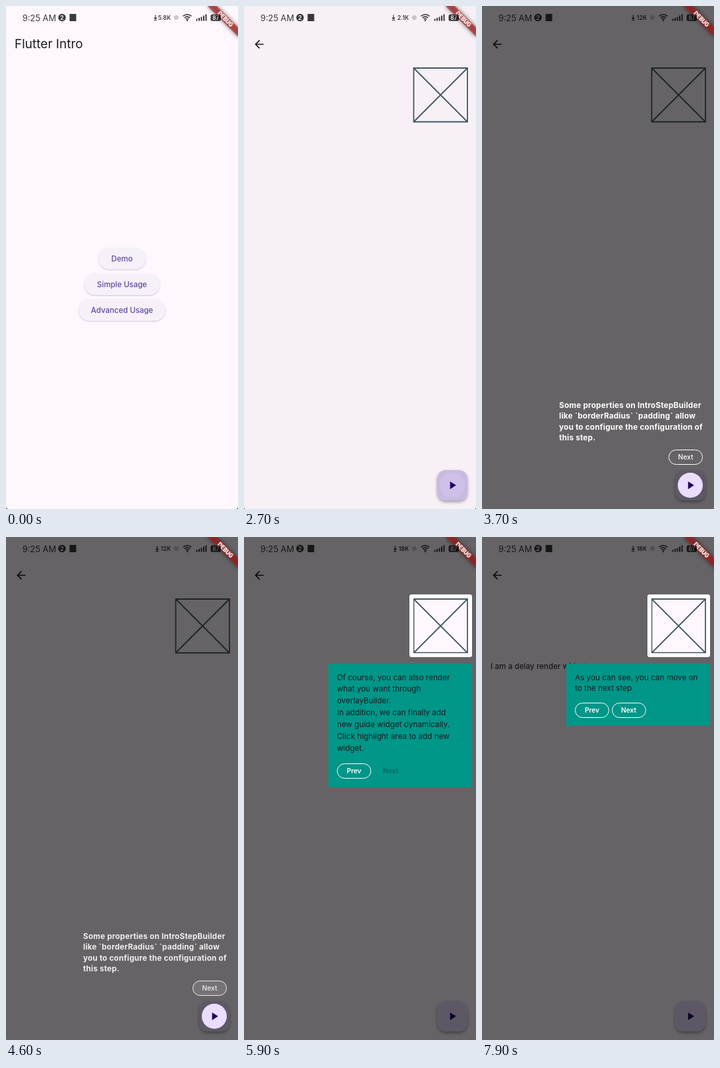
Animation, 352 px wide and 762 px high, one loop 8 s. Source, as an HTML page:

```html
<!DOCTYPE html>
<html lang="en">
<head>
<meta charset="utf-8">
<title>Flutter Intro</title>
<style>
/* One loop is 8 s, so 1.25% is one 100 ms step. */
html, body { margin: 0; width: 100%; height: 100%; overflow: hidden; background: #222; }
body { font: 400 11.75px Inter, sans-serif; color: #1d1b20; }
div, svg.layer { position: absolute; box-sizing: border-box; white-space: nowrap; }
#stage { width: 352px; height: 762px; overflow: hidden; background: #fef8fe; border-radius: 0 0 4px 4px; }
.page { inset: 0; background: #fef8fe; }
.anim { animation: 8s step-end infinite; }

.title { left: 13px; top: 46px; font-size: 19px; line-height: 24px; }
.pill { left: 176px; height: 33px; border-radius: 17px; transform: translateX(-50%); overflow: hidden;
  background: #f6f1f9; box-shadow: 0 1px 2px #0003; color: #5f4a9e;
  font-weight: 500; font-size: 11.55px; line-height: 34px; text-align: center; }
.ripple { border-radius: 50%; }
.pill .ripple { left: -10px; top: -30px; width: 92px; height: 92px; background: #6750a414; animation-name: tap-demo; }

#demo { animation-name: open-page; }
.fab { left: 293px; top: 703px; width: 46px; height: 46px; border-radius: 13px; overflow: hidden; background: #eaddff; }
.fab-shadow { left: 293px; top: 703px; width: 46px; height: 46px; border-radius: 13px; box-shadow: 0 3px 5px #0004, 0 1px 3px #0002; }
.fab .ripple { left: -11px; top: -11px; width: 68px; height: 68px; background: #21005d21; animation-name: tap-fab; }
.late { left: 13px; top: 188px; line-height: 17px; animation-name: late; }

.hole { left: 297px; top: 707px; width: 38px; height: 38px; border-radius: 19px;
  box-shadow: 0 0 0 2000px #0009; animation-name: mask, move; }
.ring { left: 251px; top: 87px; width: 95px; height: 95px; border: 6px solid #fff; border-radius: 4px; animation-name: ring; }

.tip { inset: 0; }
.tip1 { animation-name: tip1; }
.tip2 { animation-name: tip2; }
.tip3 { animation-name: tip3; }
.note { left: 117px; top: 597px; color: #fff; font-weight: 700; letter-spacing: .2px; line-height: 16.25px; }
.card { left: 128px; top: 191.5px; width: 218px; padding: 13px; background: #009688; }
.btn { width: 52px; height: 23px; border: 1px solid #fff; border-radius: 12px; color: #fff;
  font-weight: 600; font-size: 10.2px; line-height: 21px; text-align: center; }
.btn.off { border-color: transparent; color: #1d1b2061; }
.tip1 .btn { left: 283px; top: 672px; font-weight: 500; animation-name: tap-next; }
.prev { left: 13px; bottom: 12.5px; }
.next { left: 68.5px; bottom: 12.5px; }

.banner { left: 299.5px; top: 14.8px; width: 65.6px; height: 9.8px; transform: rotate(45deg);
  color: #fff; font-weight: 900; font-size: 8.4px; line-height: 10px; text-align: center; }
.banner::before, .banner::after { content: ""; position: absolute; inset: 0; z-index: -1; background: #b71c1ca0; }
.banner::before { background: #0008; filter: blur(3.3px); }
.status { left: 0; top: 0; opacity: .77; }
.speed1 { animation-name: speed1; }
.speed2 { animation-name: speed2; }
.speed3 { animation-name: speed3; }
.speed4 { animation-name: speed4; }

@keyframes tap-demo {
  0% { transform: scale(0); }
  1.25% { transform: scale(.3); animation-timing-function: steps(3); }
  5%, 100% { transform: scale(1); }
}
@keyframes open-page {
  0% { opacity: 0; transform: scale(.85); }
  10% { opacity: .6; transform: scale(.9); }
  11.25% { opacity: 1; transform: scale(.985); }
  12.5% { opacity: 1; transform: scale(.997); }
  13.75%, 100% { opacity: 1; transform: none; }
}
@keyframes tap-fab {
  0% { transform: scale(0); opacity: 1; }
  27.5% { transform: scale(.25); opacity: 1; animation-timing-function: steps(5); }
  33.75% { transform: scale(1); opacity: 1; }
  35% { transform: scale(1); opacity: .8; }
  36.25% { transform: scale(1); opacity: .5; }
  37.5% { transform: scale(1); opacity: .2; }
  38.75%, 100% { transform: scale(1); opacity: 0; }
}
@keyframes mask {
  0% { opacity: 0; }
  33.75% { opacity: .05; }
  35% { opacity: .4; }
  36.25% { opacity: .77; }
  37.5%, 100% { opacity: 1; }
}
@keyframes move {
  0% { left: 297px; top: 707px; width: 38px; height: 38px; border-radius: 19px; }
  57.5% { left: 297px; top: 707px; width: 38px; height: 38px; border-radius: 19px; animation-timing-function: steps(3); }
  61.25%, 100% { left: 251px; top: 87px; width: 95px; height: 95px; border-radius: 4px; }
}
@keyframes ring { 0% { opacity: 0; } 61.25%, 100% { opacity: 1; } }
@keyframes tap-next {
  0% { background: #fff0; }
  51.25% { background: #fff0; animation-timing-function: steps(4); }
  56.25%, 100% { background: #ffffff1f; }
}
@keyframes tip1 {
  0% { opacity: 0; }
  33.75% { opacity: .05; }
  35% { opacity: .4; }
  36.25% { opacity: .77; }
  37.5% { opacity: 1; }
  57.5% { opacity: .9; }
  58.75% { opacity: .6; }
  60% { opacity: .3; }
  61.25%, 100% { opacity: 0; }
}
@keyframes tip2 {
  0% { opacity: 0; }
  61.25% { opacity: .1; }
  62.5% { opacity: .45; }
  63.75% { opacity: .8; }
  65% { opacity: 1; }
  90% { opacity: .65; }
  91.25% { opacity: .27; }
  92.5%, 100% { opacity: 0; }
}
@keyframes tip3 {
  0% { opacity: 0; }
  93.75% { opacity: .1; }
  95% { opacity: .45; }
  96.25% { opacity: .8; }
  97.5%, 100% { opacity: 1; }
}
@keyframes late { 0% { opacity: 0; } 88.75%, 100% { opacity: 1; } }
@keyframes speed1 { 0% { opacity: 1; } 18.75%, 100% { opacity: 0; } }
@keyframes speed2 { 0% { opacity: 0; } 18.75% { opacity: 1; } 46.25%, 100% { opacity: 0; } }
@keyframes speed3 { 0% { opacity: 0; } 46.25% { opacity: 1; } 71.25%, 100% { opacity: 0; } }
@keyframes speed4 { 0% { opacity: 0; } 71.25%, 100% { opacity: 1; } }
</style>
</head>
<body>
<div id="stage">
  <div class="page">
    <div class="title">Flutter Intro</div>
    <div class="pill" style="top:366px;width:72px">Demo<div class="ripple anim"></div></div>
    <div class="pill" style="top:405px;width:115px">Simple Usage</div>
    <div class="pill" style="top:444px;width:132px">Advanced Usage</div>
  </div>

  <div class="page anim" id="demo">
    <svg class="layer" width="352" height="200">
      <path transform="translate(13 48) scale(.836)" fill="#1d1b20"
        d="M20 11H7.83l5.59-5.59L12 4l-8 8 8 8 1.41-1.41L7.83 13H20z"/>
      <path fill="none" stroke="#455a64" stroke-width="1.8" d="M257.5 94h81.5v81.5h-81.5zl81.5 81.5m0-81.5l-81.5 81.5"/>
    </svg>
    <div class="late anim">I am a delay render widget.</div>
    <div class="fab-shadow"></div>
    <div class="fab">
      <div class="ripple anim"></div>
      <svg class="layer" width="46" height="46"><path fill="#21005d" d="M19.7 17.3v11.6l9.1-5.8z"/></svg>
    </div>
  </div>

  <div class="hole anim"></div>
  <div class="ring anim"></div>

  <div class="tip tip1 anim">
    <div class="note">Some properties on IntroStepBuilder<br>like `borderRadius` `padding` allow<br>you to configure the configuration of<br>this step.</div>
    <div class="btn anim">Next</div>
  </div>
  <div class="tip tip2 anim">
    <div class="card" style="height:187px;line-height:17.85px">Of course, you can also render<br>what you want through<br>overlayBuilder.<br>In addition, we can finally add<br>new guide widget dynamically.<br>Click highlight area to add new<br>widget.
      <div class="btn prev">Prev</div><div class="btn next off">Next</div>
    </div>
  </div>
  <div class="tip tip3 anim">
    <div class="card" style="height:94.5px;line-height:16.3px">As you can see, you can move on<br>to the next step
      <div class="btn prev">Prev</div><div class="btn next">Next</div>
    </div>
  </div>

  <div class="banner">DEBUG</div>

  <svg class="layer status" width="352" height="36" font-family="Inter, sans-serif">
    <defs>
      <mask id="cut">
        <rect width="352" height="36" fill="#fff"/>
        <text x="85" y="20.6" font-size="8.5" font-weight="700" text-anchor="middle">2</text>
        <text x="318.3" y="20.9" font-size="8.5" font-weight="600" text-anchor="middle">87</text>
      </mask>
      <path id="down" d="M2.3 0v6M.2 4l2.1 2.3L4.4 4M0 8h4.6" fill="none" stroke="#000" stroke-width="1.2"/>
    </defs>
    <text x="25" y="22.6" font-size="12.8">9:25 AM</text>
    <g mask="url(#cut)">
      <circle cx="85" cy="17.5" r="5.7"/>
      <rect x="310.5" y="12.8" width="15.5" height="10" rx="2.5"/>
    </g>
    <rect x="96.5" y="12" width="10" height="11"/>
    <g font-size="8.7" font-weight="600" text-anchor="end">
      <g class="speed1 anim"><use href="#down" x="224.5" y="13.5"/><text x="250" y="20.8">5.8K</text></g>
      <g class="speed2 anim"><use href="#down" x="224.5" y="13.5"/><text x="250" y="20.8">2.1K</text></g>
      <g class="speed3 anim"><use href="#down" x="227" y="13.5"/><text x="250" y="20.8">12K</text></g>
      <g class="speed4 anim"><use href="#down" x="227" y="13.5"/><text x="250" y="20.8">18K</text></g>
    </g>
    <circle cx="258.3" cy="17.5" r="3.6" opacity=".25"/>
    <g fill="none" stroke="#000" stroke-width="1.5">
      <path d="M268.5 15.4q6.5-5.4 13 0M270.7 17.9q4.3-3.6 8.6 0M272.7 20.2q2.3-1.9 4.6 0"/>
      <path stroke-width="2" d="M289.5 22.5v-3M293 22.5v-4.5M296.5 22.5v-6M300 22.5v-8M303.5 22.5v-10"/>
    </g>
    <circle cx="275" cy="22" r="1.2"/>
  </svg>
</div>
</body>
</html>
```
